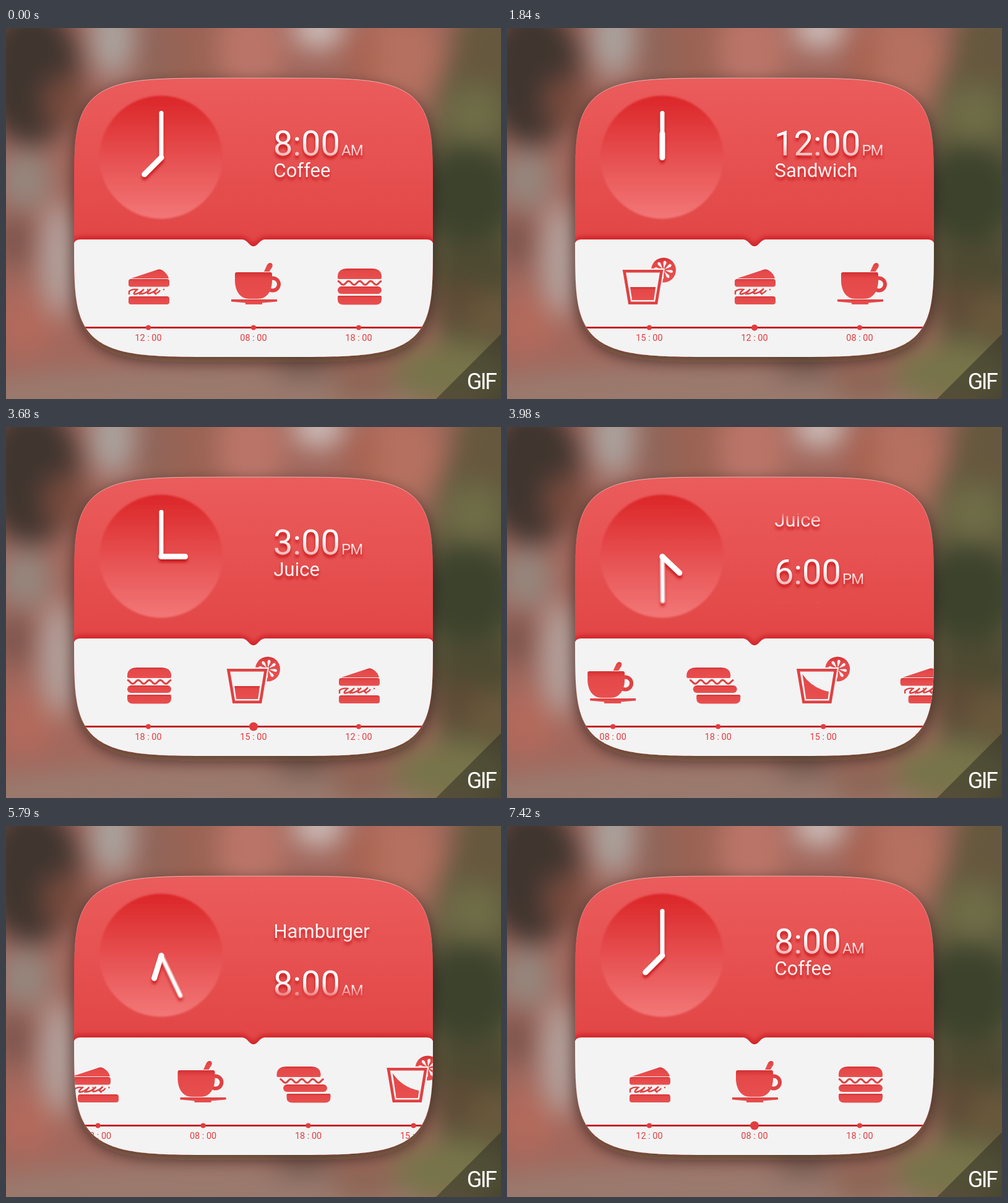
An HTML page that plays this animation: 800 px wide and 600 px high, repeating every 7.45 s.

```html
<!DOCTYPE html>
<html lang="en">
<head>
<meta charset="utf-8">
<title>Meal clock</title>
<style>
  html, body { margin: 0; width: 100%; height: 100%; overflow: hidden; background: #96685c; }
  svg { position: absolute; left: 0; top: 0; width: 800px; height: 600px; }
  text { font-family: Roboto, "Open Sans", sans-serif; }
  .icon { fill: url(#ink); }
  .line { fill: none; stroke: #e04143; }
  .paper { fill: #f3f3f3; }
</style>
</head>
<body>
<svg viewBox="0 0 800 600">
  <defs>
    <filter id="soft" x="-10%" y="-10%" width="120%" height="120%" color-interpolation-filters="sRGB"><feGaussianBlur stdDeviation="21"/></filter>
    <filter id="cardShadow" x="-20%" y="-20%" width="140%" height="140%"><feDropShadow dx="0" dy="8" stdDeviation="12" flood-color="#100805" flood-opacity=".55"/></filter>
    <filter id="panelShadow" x="-10%" y="-10%" width="120%" height="120%"><feDropShadow dx="0" dy="-3" stdDeviation="5" flood-color="#c40f12" flood-opacity=".85"/></filter>
    <filter id="rim" x="-10%" y="-10%" width="120%" height="120%"><feGaussianBlur stdDeviation="1.6"/></filter>
    <filter id="speed" filterUnits="userSpaceOnUse" x="140" y="100" width="220" height="220"><feGaussianBlur stdDeviation="1.3"/></filter>
    <filter id="drop" filterUnits="userSpaceOnUse" x="110" y="60" width="580" height="280" color-interpolation-filters="sRGB"><feDropShadow dx="0" dy="5" stdDeviation="2" flood-color="#c51216" flood-opacity=".85"/></filter>
    <linearGradient id="red" x1="0" y1="0" x2="0" y2="1"><stop stop-color="#eb5c5c"/><stop offset=".58" stop-color="#e24646"/><stop offset="1" stop-color="#e24646"/></linearGradient>
    <linearGradient id="dial" x1="0" y1="0" x2="0" y2="1"><stop stop-color="#dc2729"/><stop offset=".12" stop-color="#de2f31"/><stop offset=".55" stop-color="#e75354"/><stop offset="1" stop-color="#f37777"/></linearGradient>
    <linearGradient id="rimLight" x1="0" y1="0" x2="0" y2="1"><stop stop-color="#fff" stop-opacity=".55"/><stop offset=".3" stop-color="#fff" stop-opacity="0"/></linearGradient>
    <linearGradient id="ink" x1="0" y1="0" x2="0" y2="1"><stop stop-color="#d52f32"/><stop offset=".22" stop-color="#e44849"/><stop offset="1" stop-color="#e94f4f"/></linearGradient>
    <linearGradient id="timeInk" gradientUnits="userSpaceOnUse" x1="0" y1="166" x2="0" y2="207"><stop stop-color="#fff"/><stop offset=".4" stop-color="#fff"/><stop offset="1" stop-color="#f9b5b5"/></linearGradient>
    <linearGradient id="nameInk" gradientUnits="userSpaceOnUse" x1="0" y1="218" x2="0" y2="246"><stop stop-color="#fff"/><stop offset="1" stop-color="#fde3e3"/></linearGradient>
    <linearGradient id="fade" gradientUnits="userSpaceOnUse" x1="0" y1="138" x2="0" y2="286"><stop stop-color="#000"/><stop offset=".12" stop-color="#fff"/><stop offset=".82" stop-color="#fff"/><stop offset="1" stop-color="#000"/></linearGradient>
    <mask id="window" maskUnits="userSpaceOnUse" x="400" y="100" width="280" height="200"><rect x="400" y="100" width="280" height="200" fill="url(#fade)"/></mask>
    <clipPath id="cardClip"><path class="card"/></clipPath>
  </defs>
  <rect width="800" height="600" fill="#a2685d"/>
  <g id="backdrop" filter="url(#soft)"></g>
  <path class="card" fill="#e14444" filter="url(#cardShadow)"/>
  <path class="card" fill="url(#red)"/>
  <path class="card" fill="none" stroke="url(#rimLight)"/>
  <circle cx="250.5" cy="209" r="99.5" fill="url(#dial)" filter="url(#rim)"/>
  <g clip-path="url(#cardClip)">
    <path class="paper" filter="url(#panelShadow)" d="M109 352Q110 342 120 342H380C391 342 392 353 400 353S409 342 420 342H680Q690 342 691 352V540H109Z"/>
    <path d="M110 484.5H690" stroke="#c32225" stroke-width="3"/>
  </g>
  <path d="M800 495V600H695Z" fill="#2b2a22" fill-opacity=".5"/>
  <text x="768" y="584" font-size="36" letter-spacing="-2.5" text-anchor="middle" fill="#fff">GIF</text>
</svg>

<svg viewBox="0 0 800 600">
  <g filter="url(#drop)" stroke="#fff" stroke-linecap="round">
    <g id="blur"><path id="minute" d="M251 209V137.500" stroke-width="7"/></g>
    <path id="hour" d="M251 209.500V171" stroke-width="9"/>
  </g>
  <g mask="url(#window)"><g id="lines" filter="url(#drop)"></g></g>
  <g id="strip" clip-path="url(#cardClip)"></g>
</svg>

<script>
const LOOP = 7450, STEP = 30, PHASE = 1870, LEAD = 60;
const $ = id => document.getElementById(id);

const meals = [
  { time: '8:00', half: 'AM', name: 'Coffee', tick: '08 : 00', angle: 225 },
  { time: '12:00', half: 'PM', name: 'Sandwich', tick: '12 : 00', angle: 360 },
  { time: '3:00', half: 'PM', name: 'Juice', tick: '15 : 00', angle: 90 },
  { time: '6:00', half: 'PM', name: 'Hamburger', tick: '18 : 00', angle: 180 }
];

function add(parent, tag, attrs = {}, text) {
  const el = document.createElementNS('http://www.w3.org/2000/svg', tag);
  for (const key in attrs) el.setAttribute(key, attrs[key]);
  if (text) el.textContent = text;
  parent.appendChild(el);
  return el;
}

// Static scenery: blurred blobs [x, y, rx, ry, colour]
[
  [820, 300, 150, 340, '#5d5a3d'], [320, 595, 400, 50, '#9a7a6e'],
  [300, 40, 60, 90, '#9a6354'], [395, 35, 55, 70, '#ba7568'], [640, 50, 65, 70, '#b5705f'],
  [40, 75, 80, 115, '#40352f'], [95, 120, 38, 45, '#774a3d'], [172, 15, 36, 65, '#aaa29d'],
  [240, 35, 24, 70, '#8d6559'], [505, 0, 42, 34, '#cbbcb8'], [575, 50, 22, 45, '#a9614f'],
  [775, 30, 55, 75, '#66583e'], [755, 140, 50, 50, '#6f6c47'],
  [745, 270, 80, 80, '#3c422c'], [760, 390, 70, 50, '#4d4a31'],
  [730, 445, 40, 40, '#5e4a36'], [785, 465, 40, 40, '#6a573b'],
  [720, 560, 100, 50, '#77744a'], [30, 245, 42, 50, '#95867d'], [15, 345, 24, 45, '#76524a'],
  [85, 375, 30, 95, '#b3a29d'], [30, 480, 50, 50, '#b26a5c'],
  [580, 575, 55, 30, '#8c6554'], [480, 550, 50, 14, '#6b554d']
].forEach(([cx, cy, rx, ry, fill]) => add($('backdrop'), 'ellipse', { cx, cy, rx, ry, fill }));

const signedPow = v => Math.sign(v) * Math.abs(v) ** (2 / 5.2);
const outline = Array.from({ length: 360 }, (_, i) => {
  const a = i * Math.PI / 180;
  return (400 + 290 * signedPow(Math.cos(a))).toFixed(2) + ' ' + (306.5 + 225.5 * signedPow(Math.sin(a))).toFixed(2);
});
document.querySelectorAll('.card').forEach(p => p.setAttribute('d', 'M' + outline.join('L') + 'Z'));

// Icons are drawn around x = 400; each layer trails the strip by up to `lag` pixels.
const slots = meals.map(meal => {
  const root = add($('strip'), 'g');
  const dot = add(root, 'circle', { cx: 400, cy: 484.5, fill: '#e23c3e' });
  add(root, 'text', { x: 400, y: 506, 'font-size': 14.5, 'text-anchor': 'middle', fill: '#e23c3e' }, meal.tick);
  return { root, dot, layers: [] };
});

function layer(i, lag) {
  const el = add(slots[i].root, 'g');
  slots[i].layers.push({ el, lag });
  return el;
}
const solid = (g, d) => add(g, 'path', { class: 'icon', d });
const stroke = (g, d, width) => add(g, 'path', { class: 'line', d, 'stroke-width': width });
const slab = (g, x, y, width, height, rx) => add(g, 'rect', { class: 'icon', x, y, width, height, rx });

function drawCoffee() {
  solid(layer(0, 16.5), 'M417 394L422 383Q425 378.500 429 380.500Q432 383 430 387L425.500 394Z');
  const cup = layer(0, 11);
  add(cup, 'circle', { class: 'line', cx: 431, cy: 414.5, r: 10, 'stroke-width': 6 });
  solid(cup, 'M373 395H427Q430 395 430 398V408C430 425 422 438 407 438H393C378 438 370 425 370 408V398Q370 395 373 395Z');
  solid(layer(0, 1), 'M364 439H438V442.500L414 444.500V447H387V444.500L364 442.500Z');
}

function drawSandwich() {
  const top = layer(1, 13.5);
  solid(top, 'M372 405L415 390.700Q419 389.500 423 392Q431 397 433 405Z');
  slab(top, 368, 406, 66, 12.5, 4);
  const filling = layer(1, 7);
  stroke(filling, 'M369 431V426Q374 421.500 382 423' + 'q-8 7 -4 7.500q7 -.5 15 -8'.repeat(3) + 'q-8 7 -4 7.500q5 0 8 -5', 2.4);
  for (let k = 0; k < 4; k++) add(filling, 'circle', { class: 'icon', cx: 386 + 13 * k, cy: k % 2 ? 423 : 430.5, r: 1.3 });
  slab(layer(1, 0.5), 368, 434, 66, 13, 4);
}

let liquid, drip;
function drawJuice() {
  const g = layer(2, 0);
  add(g, 'circle', { class: 'icon', cx: 423, cy: 391.5, r: 20 });
  for (let k = 0; k < 8; k++)
    add(g, 'path', { class: 'paper', d: 'M423 389L420.600 380Q420.500 376.500 423 376.300Q425.500 376.500 425.400 380Z', transform: `rotate(${k * 45 + 10} 423 391.5)` });
  const glass = 'M359.500 393.300H419.700L411.200 444.700H368.200Z';
  add(g, 'path', { class: 'paper', d: glass, stroke: '#f3f3f3', 'stroke-width': 9 });
  stroke(g, glass, 4.6);
  liquid = add(g, 'path', { class: 'icon' });
  drip = add(g, 'circle', { class: 'icon', cx: 411.5, r: 2.6 });
}

function drawBurger() {
  solid(layer(3, 17), 'M368 406Q366 406 366 404V401Q367 389 382 389H421Q436 389 437 401V404Q437 406 435 406Z');
  let wave = '';
  for (let x = 366; x <= 437; x++) wave += (wave ? 'L' : 'M') + x + ' ' + (412.3 - 3 * Math.cos((x - 366) * Math.PI / 8.9)).toFixed(2);
  stroke(layer(3, 12), wave, 3);
  slab(layer(3, 6.5), 366, 418, 71, 12, 6);
  solid(layer(3, 1), 'M368 433H435Q437 433 437 435V439Q437 447.500 428 447.500H375Q366 447.500 366 439V435Q366 433 368 433Z');
}
drawCoffee(); drawSandwich(); drawJuice(); drawBurger();

// Two pairs of rolling lines: the leaving meal and the arriving one.
const rolls = [70, 109, 109, 143].map((start, i) => {
  const isName = i % 2 === 1, arriving = i > 1;
  const el = add($('lines'), 'text', isName
    ? { x: 432.5, y: 241, 'font-size': 31, fill: 'url(#nameInk)' }
    : { x: 432, y: 206, 'font-size': 56, fill: 'url(#timeInk)' });
  return { el, start, isName, arriving };
});

function setLine(roll, meal) {
  if (roll.meal === meal) return;
  roll.meal = meal;
  roll.el.textContent = roll.isName ? meal.name : meal.time;
  if (!roll.isName) add(roll.el, 'tspan', { 'font-size': 24, dx: 2, 'letter-spacing': -1 }, meal.half);
}

const bezier = (x1, y1, x2, y2) => x => {
  if (x <= 0) return 0;
  if (x >= 1) return 1;
  const at = (s, a, b) => 3 * a * s * (1 - s) ** 2 + 3 * b * s * s * (1 - s) + s ** 3;
  let lo = 0, hi = 1;
  for (let i = 0; i < 24; i++) {
    const s = (lo + hi) / 2;
    if (at(s, x1, x2) < x) lo = s; else hi = s;
  }
  return at(lo, y1, y2);
};
const ease = bezier(0.25, 0.1, 0.25, 1);
const minuteEase = bezier(0.15, 0.35, 0.6, 0.75);
const hourEase = bezier(0.3, 0.24, 0.5, 0.95);

function track(keys, u) {
  const i = keys.findIndex(k => k[0] > u);
  if (i < 0) return keys[keys.length - 1][1];
  if (i === 0) return keys[0][1];
  const [t0, a] = keys[i - 1], [t1, b] = keys[i];
  return a + (b - a) * (1 - Math.cos(Math.PI * (u - t0) / (t1 - t0))) / 2;
}

const DRAG = [[70, 0], [200, -1], [370, -1], [600, 0]];
const BOUNCE = [[560, 0], [650, 0.18], [690, 0]];
const PULSE = [[-30, 7], [0, 5.5], [60, 4], [520, 4], [650, 8.5], [665, 8.5], [690, 7]];
const SLOSH = [[70, 0], [200, 1], [370, 1], [600, 0], [660, -0.35], [740, -0.65], [880, 0.5], [1020, -0.2], [1110, 0.07], [1170, 0]];

function drawLiquid(u) {
  const tilt = track(SLOSH, u);
  const left = 419 - tilt * (tilt > 0 ? 19 : 10);
  const right = 419 + tilt * (tilt > 0 ? 9 : 12);
  const lx = 366.2 + (left - 399) * 0.145, rx = 413 - (right - 399) * 0.143;
  const sag = (left + right) / 2 + 8 * Math.max(0, tilt);
  liquid.setAttribute('d', `M${lx} ${left}Q${385 - 4 * tilt} ${sag} ${rx} ${right}L407.300 440H372.200Z`);
  const y = 405 + 20 * ((u - 660) / 200) ** 2;
  drip.setAttribute('cy', y);
  drip.setAttribute('visibility', y < 418 ? 'visible' : 'hidden');
}

function turnHands(u, from, to) {
  const x = (u - 60) / 600;
  const start = from.angle % 360;
  $('minute').setAttribute('transform', `rotate(${360 * minuteEase(x)} 251 209.5)`);
  $('hour').setAttribute('transform', `rotate(${start + (to.angle - start) * hourEase(x)} 251 209.5)`);
  $('blur').setAttribute('filter', x > 0 && x < 0.95 ? 'url(#speed)' : 'none');
}

function render(t) {
  const clock = Math.floor(t / STEP) * STEP + LEAD;
  const phase = Math.floor(clock / PHASE) % 4, u = clock % PHASE;
  const from = meals[phase], to = meals[(phase + 1) % 4];

  turnHands(u, from, to);

  for (const roll of rolls) {
    setLine(roll, roll.arriving ? to : from);
    const p = ease((u - roll.start) / 474);
    roll.el.setAttribute('transform', `translate(0 ${128 * ((roll.arriving ? 1 : 0) - p)})`);
  }

  const shift = phase + ease((u - 82) / 520);
  slots.forEach(({ root, dot, layers }, i) => {
    const d = (shift - i + 6) % 4 - 2;
    root.setAttribute('transform', `translate(${170 * d} 0)`);
    dot.setAttribute('r', Math.abs(d) < 0.5 ? track(PULSE, u) : 4);
    const sway = track(DRAG, u) + (i === 3 ? track(BOUNCE, u) : 0);
    for (const { el, lag } of layers) el.setAttribute('transform', `translate(${lag * sway} 0)`);
  });
  drawLiquid(u);
}

const begin = performance.now();
function tick() {
  render((performance.now() - begin) % LOOP);
  requestAnimationFrame(tick);
}
tick();
</script>
</body>
</html>
```
